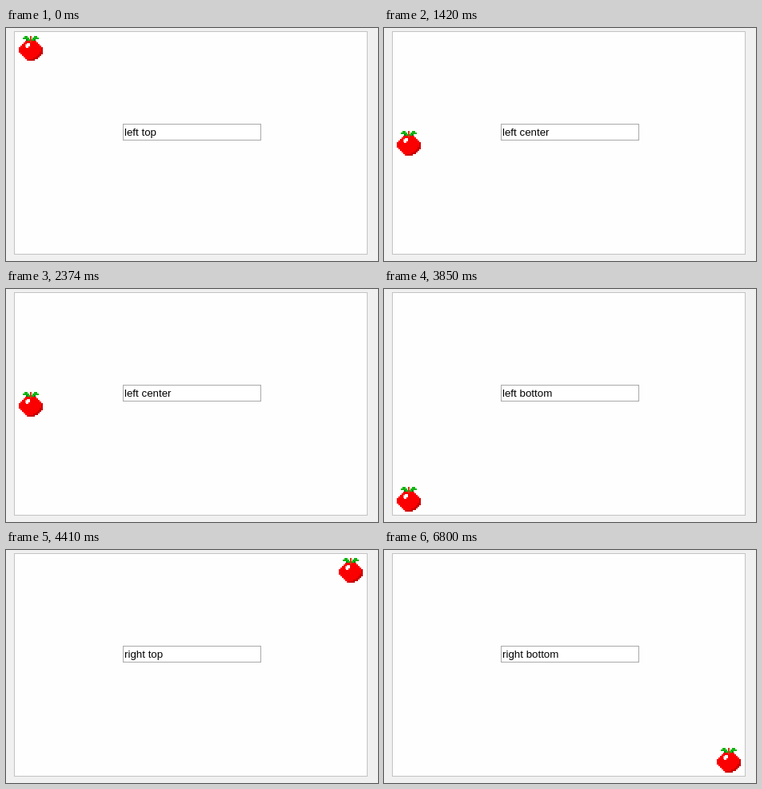
These frames come from a looping animation (465 px wide and 292 px high, 8000 ms). An HTML page:

```html
<!DOCTYPE html>
<html lang="en">
<head>
<meta charset="utf-8">
<title>Background position</title>
<style>
  html, body { margin: 0; width: 100%; height: 100%; overflow: hidden; background: #f0f0f0; }
  svg { display: block; }
  text { font: 13.333px "Liberation Sans", Arial, sans-serif; white-space: pre; }
</style>
</head>
<body>
<svg width="465" height="292" viewBox="0 0 465 292">
  <rect x="10.5" y="4.5" width="441" height="279" fill="#fefefe" stroke="#c3c3c3"/>
  <g id="tomato" shape-rendering="crispEdges">
    <!-- body -->
    <path fill="#fb0000" d="M8 6H22V8H24V10H26V12H28V14H30V23H28V25H26V27H24V29H20V31H10V29H8V27H6V25H4V23H2V21H0V14H2V12H4V10H6V8H8Z"/>
    <!-- shaded edge -->
    <path fill="#c80000" d="M28 14H30V23H28V25H26V27H24V29H20V31H12V29H18V27H22V25H24V23H26V20H28Z"/>
    <!-- highlight -->
    <path fill="#ff8c80" d="M8 10H10V14H8Z"/>
    <path fill="#fff" d="M10 9H14V13H12V15H9V11H10Z"/>
    <!-- leaves and stem -->
    <path fill="#12b412" d="M7 0H11V2H13V4H15V6H11V4H5V2H7ZM19 0H23V2H25V4H19V6H16V4H17V2H19Z"/>
    <path fill="#0a7d12" d="M9 4H11V6H9ZM19 4H21V6H19Z"/>
    <path fill="#d03a10" d="M14 0H16V8H14Z"/>
  </g>
  <rect x="146.5" y="120.5" width="172" height="20" fill="#fff" stroke="#a9a9a9"/>
  <text id="label" x="148" y="135"></text>
</svg>
<script>
  const LOOP = 8000;
  const steps = [
    [0, "left top"],
    [1420, "left center"],
    [3010, "left bottom"],
    [4410, "right top"],
    [5710, "right center"],
    [6800, "right bottom"]
  ];
  const place = { left: 16, right: 416, top: 10, center: 129, bottom: 248 };
  const tomato = document.getElementById("tomato");
  const label = document.getElementById("label");
  let shown;

  function draw(now) {
    const t = now % LOOP;
    const value = steps.findLast(([start]) => t >= start)[1];
    if (value !== shown) {
      shown = value;
      const [x, y] = value.split(" ").map(word => place[word]);
      tomato.setAttribute("transform", `translate(${x} ${y})`);
      label.textContent = value;
    }
  }

  const origin = performance.now();
  function tick() {
    draw(performance.now() - origin);
    requestAnimationFrame(tick);
  }
  tick();
</script>
</body>
</html>
```
